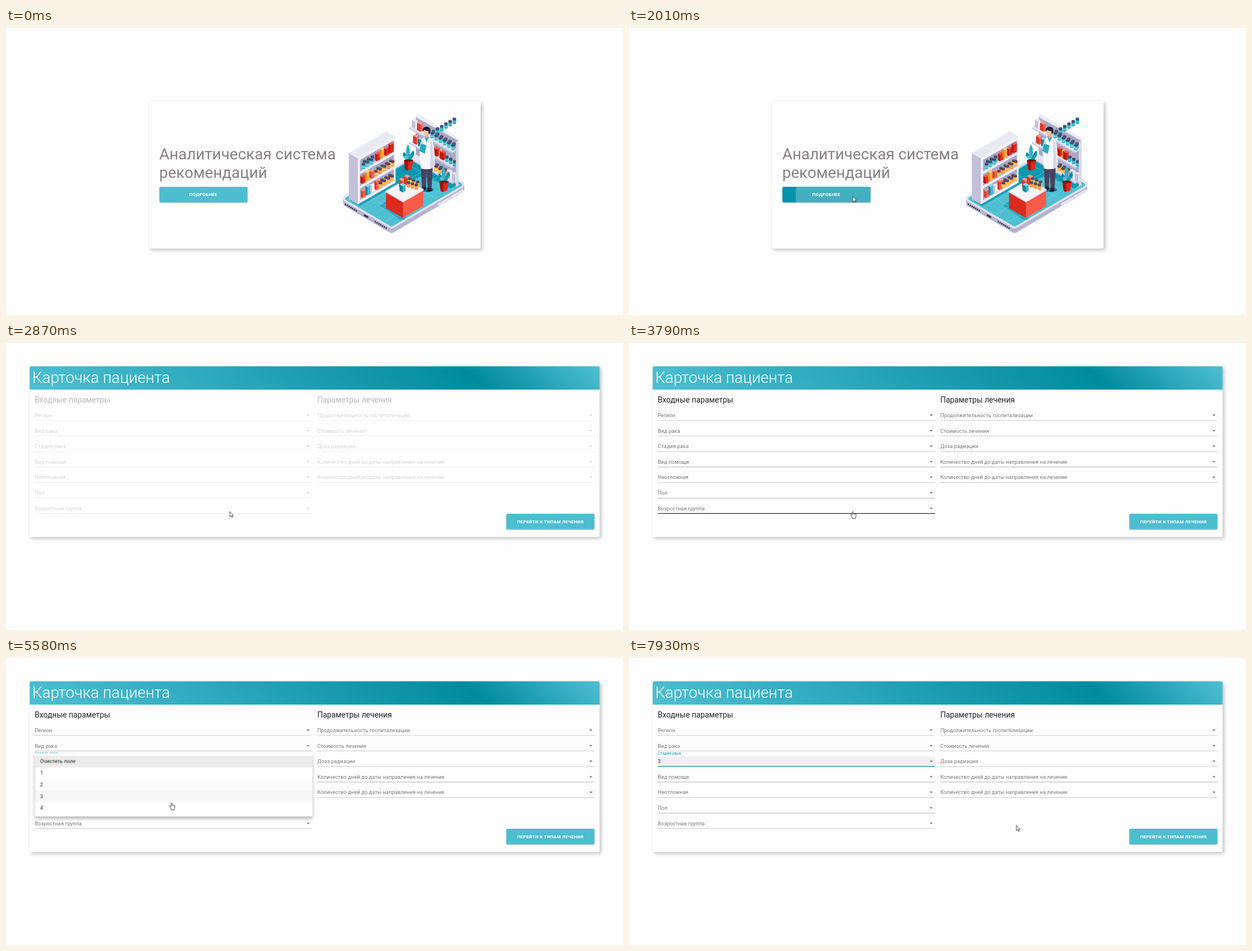
An HTML page that plays this animation: 1096 px wide and 511 px high, repeating every 8 s.

```html
<!DOCTYPE html>
<html lang="ru">
<head>
<meta charset="utf-8">
<title>Карточка пациента</title>
<style>
html, body { margin: 0; width: 100%; height: 100%; overflow: hidden; background: #fefefe; }
body { position: relative; font-family: Roboto, Arial, sans-serif; color: rgba(0,0,0,.87); }
body * { box-sizing: border-box; }
/* The interface is laid out on a 1903px wide page and scaled to the stage */
#page { position: absolute; left: 0; top: 0; width: 1903px; height: 888px; transform: scale(.57593); transform-origin: 0 0; }
#page div, #page svg, #cursor, #cursor svg { position: absolute; }
.card { background: #fefefe; border-radius: 5px; box-shadow: 5px 5px 12px rgba(0,0,0,.24), 0 0 4px rgba(0,0,0,.07); }
.h3 { font-size: 48px; line-height: 56px; white-space: nowrap; }
.btn {
  width: 272px; height: 48px; border-radius: 4px; overflow: hidden; background: #4dbdd0; color: #fff;
  font: 700 14px/48px Roboto, Arial, sans-serif; letter-spacing: .4px; text-align: center;
}
.lift { width: 272px; height: 48px; border-radius: 4px; box-shadow: 0 3px 1px -2px rgba(0,0,0,.2), 0 2px 2px rgba(0,0,0,.14), 0 1px 5px rgba(0,0,0,.12); }

#home { inset: 0; animation: home 8s step-end infinite; }
#home .card { left: 441px; top: 226px; width: 1023px; height: 456px; }
#home .h3 { left: 472.5px; top: 363px; color: #868184; }
#home .lift { left: 472.5px; top: 490.5px; }
#home .btn { animation: hover 8s infinite; }
#home .btn span { position: relative; }
#ripple { left: -2px; top: -189px; width: 438px; height: 438px; border-radius: 50%; background: #fff; opacity: 0; animation: ripple 8s infinite; }
#art { left: 0; top: 0; width: 1903px; height: 887.26px; }
@keyframes home { 0% { visibility: visible } 28% { visibility: hidden } }
@keyframes hover { 0%, 15% { background: #4dbdd0 } 18.1%, 100% { background: #0093aa } }
@keyframes ripple {
  0%, 22.2% { opacity: 0; transform: scale(0) }
  22.25% { opacity: .27; transform: scale(0); animation-timing-function: cubic-bezier(.4,0,.2,1) }
  27.75%, 28% { opacity: .27; transform: scale(1) }
  28.1%, 100% { opacity: 0; transform: scale(1) }
}

#patient { inset: 0; opacity: 0; animation: enter 8s infinite; }
#patient > .card { left: 73px; top: 72px; width: 1758px; height: 206px; animation: grow 8s step-end infinite; }
#patient .head {
  left: 0; top: 0; width: 100%; height: 72px; padding: 8px; border-radius: 5px 5px 0 0; color: #fff; font-weight: 300;
  background: linear-gradient(45deg, #4fbfd2 0%, #008b9f 77%, #4fbfd2 100%);
}
#patient .lift { right: 16px; bottom: 24px; }
@keyframes enter {
  0%, 28% { opacity: 0; animation-timing-function: cubic-bezier(.4,0,.2,1) }
  30.8%, 100% { opacity: 1 }
}
@keyframes grow { 0% { height: 206px } 35.125% { height: 528px } }

#spinner { left: 932px; top: 160px; width: 40px; height: 40px; fill: none; stroke-width: 3.6; animation: spin 8s infinite linear, wait 8s step-end infinite; }
@keyframes spin { 0%, 28% { transform: rotate(117deg) } 31.25%, 100% { transform: rotate(184deg) } }
@keyframes wait { 0% { visibility: visible } 35.125% { visibility: hidden } }

#form { inset: 0; opacity: 0; animation: form 8s infinite; }
@keyframes form { 0%, 35.125% { opacity: 0 } 38.75%, 100% { opacity: 1 } }
.h5 { top: 160px; font-size: 24px; line-height: 32px; white-space: nowrap; }
.field { width: 855.5px; height: 33px; border-bottom: 1px solid rgba(0,0,0,.42); }
.label { left: 0; top: 8.5px; font-size: 16px; line-height: 16px; letter-spacing: .15px; white-space: nowrap; color: rgba(0,0,0,.54); transform-origin: 0 0; }
.drop { right: 0; top: 4px; width: 24px; height: 24px; fill: rgba(0,0,0,.54); }
.line { left: 0; bottom: -1px; width: 100%; height: 2px; background: rgba(0,0,0,.87); opacity: 0; }
.float { animation: float 8s infinite; }
.fill { inset: 1px 0 0; background: rgba(0,0,0,.055); opacity: 0; animation: fill 8s infinite; }
.focus { background: #0097ad; opacity: 1; animation: focus 8s infinite; }
.value { left: 0; top: 8.5px; font-size: 16px; line-height: 16px; animation: value 8s step-end infinite; }
@keyframes float {
  0%, 62% { transform: none; color: rgba(0,0,0,.54); animation-timing-function: cubic-bezier(0,0,.2,1) }
  64.5%, 100% { transform: translateY(-23px) scale(.75); color: #0097ad }
}
@keyframes fill { 0%, 62% { opacity: 0 } 63%, 100% { opacity: 1 } }
@keyframes focus { 0%, 62% { transform: scaleX(0) } 64.5%, 100% { transform: none } }
@keyframes value { 0% { visibility: hidden } 88.5% { visibility: visible } }

#menu {
  left: 88.5px; top: 294px; width: 856px; height: 196px; border-radius: 4px; background: #fff; opacity: 0; transform-origin: 50% 26px;
  box-shadow: 0 5px 5px -3px rgba(0,0,0,.2), 0 8px 10px 1px rgba(0,0,0,.14), 0 3px 14px 2px rgba(0,0,0,.12);
  animation: menu 8s infinite;
}
.item { left: 0; width: 100%; height: 36px; padding-left: 16px; font-size: 16px; line-height: 36px; letter-spacing: .15px; }
.item:first-child { font-style: italic; background: #ebebeb; }
.tint { inset: 0; background: rgba(0,0,0,.04); opacity: 0; }
@keyframes menu {
  0%, 62% { opacity: 0; transform: scale(.75,.5625); animation-timing-function: cubic-bezier(.4,0,.2,1) }
  65%, 88.75% { opacity: 1; transform: none; animation-timing-function: cubic-bezier(.4,0,.2,1) }
  91.25%, 100% { opacity: 0; transform: scale(.75,.5625) }
}

#cursor { left: 0; top: 0; width: 0; height: 0; animation: move 8s linear infinite; }
#cursor svg { left: -8px; top: -2px; width: 24px; height: 24px; fill: #fff; stroke: #222; stroke-width: 1.4; stroke-linejoin: round; overflow: visible; }
#arrow { animation: arrow 8s step-end infinite; }
#hand { animation: hand 8s step-end infinite; }
@keyframes arrow { 0% { visibility: hidden } 2.625% { visibility: visible } 47.375% { visibility: hidden } 95.5% { visibility: visible } }
@keyframes hand { 0% { visibility: hidden } 47.375% { visibility: visible } 95.5% { visibility: hidden } }
@keyframes move {
  0%, 2.625% { transform: translate(993px,505px) }
  5.5% { transform: translate(770px,440px) }
  8.5% { transform: translate(590px,368px) }
  12.25%, 12.5% { transform: translate(468px,324px) }
  15% { transform: translate(426px,309px) }
  17.5% { transform: translate(401px,302px) }
  20%, 48.25% { transform: translate(397.5px,300px) }
  50.75% { transform: translate(392px,284px) }
  52.125% { transform: translate(365px,256px) }
  53.625% { transform: translate(338px,229px) }
  55.125% { transform: translate(312px,203px) }
  56.5% { transform: translate(296px,192px) }
  57.125%, 67.1% { transform: translate(294.5px,191px) }
  70.6% { transform: translate(294px,279px) }
  73.75%, 78% { transform: translate(293px,226px) }
  81.6%, 82.6% { transform: translate(297px,234px) }
  83.5% { transform: translate(298.5px,239px) }
  84.6%, 85.6% { transform: translate(299px,240px) }
  86.4%, 91% { transform: translate(299.5px,243px) }
  93.5% { transform: translate(410px,262px) }
  95.5% { transform: translate(550px,282px) }
  98.1% { transform: translate(682px,297px) }
  99.1%, 100% { transform: translate(688px,298px) }
}
</style>
</head>
<body>
<div id="page">
  <div id="home">
    <div class="card"></div>
    <div class="h3">Аналитическая система<br>рекомендаций</div>
    <div class="lift"><div class="btn"><div id="ripple"></div><span>ПОДРОБНЕЕ</span></div></div>
    <svg id="art" viewBox="0 0 1096 511"></svg>
  </div>
  <div id="patient">
    <div class="card">
      <div class="head h3">Карточка пациента</div>
      <div class="lift"><div class="btn">ПЕРЕЙТИ К ТИПАМ ЛЕЧЕНИЯ</div></div>
    </div>
    <svg id="spinner" viewBox="22 22 44 44">
      <circle cx="44" cy="44" r="20.2" stroke="#e9e9e9"/>
      <circle cx="44" cy="44" r="20.2" stroke="#4dbdd0" stroke-dasharray="88 127"/>
    </svg>
    <div id="form">
      <div class="h5" style="left:88.5px">Входные параметры</div>
      <div class="h5" style="left:960px">Параметры лечения</div>
    </div>
    <div id="menu"></div>
  </div>
</div>
<div id="cursor">
  <svg id="arrow"><g transform="translate(8 2) scale(.58)"><path d="M0 0V16.5L4 13 6.5 18.7 9 17.6 6.6 12H11.5Z"/></g></svg>
  <svg id="hand"><g transform="translate(8 2) scale(.6) translate(-6 -1)"><path d="M6 1.2c-1 0-1.7.8-1.7 1.7V12L3 10.5c-.8-1-2.2-1-2.7-.2-.4.7-.2 1.4.3 2.1L4.5 18v3.5H14v-3c1-1.8 1.6-3.5 1.6-5.5V9.5c0-1.6-2-1.9-2.4-.6-.2-1.6-2.4-1.9-2.8-.4-.3-1.5-2.4-1.6-2.7-.2V2.9c0-.9-.7-1.7-1.7-1.7z"/></g></svg>
</div>
<script>
const $ = id => document.getElementById(id);
const sheet = document.head.appendChild(document.createElement('style'));

// Opacity keyframes that are on during each [start, end] span, in ms
function glow(name, spans) {
  const ramp = 60, at = (t, o) => `${Math.min(t, 8000) / 80}%{opacity:${o}}`;
  const body = spans.map(([a, b]) => at(a, 0) + at(a + ramp, 1) + at(b, 1) + at(b + ramp, 0)).join('');
  sheet.textContent += `@keyframes ${name}{0%{opacity:0}${body}100%{opacity:0}}`;
  return `style="animation:${name} 8s infinite"`;
}

// Form
const rowHover = { 2: [4500, 5000], 3: [4330, 4410], 4: [4210, 4290], 5: [4080, 4170], 6: [3728, 4060] };
const days = 'Количество дней до даты направления на лечение';
const columns = [
  ['Регион', 'Вид рака', 'Стадия рака', 'Вид помощи', 'Неотложная', 'Пол', 'Возростная группа'],
  ['Продолжительность госпитализации', 'Стоимость лечения', 'Доза радиации', days, days]
];
columns.forEach((names, col) => names.forEach((name, i) => {
  const active = !col && i === 2, hot = !col && rowHover[i];
  $('form').insertAdjacentHTML('beforeend',
    `<div class="field" style="left:${col ? 960 : 88.5}px;top:${207 + 48 * i}px">
      ${active ? '<div class="fill"></div><div class="value">3</div>' : ''}
      <div class="label ${active ? 'float' : ''}">${name}</div>
      <svg class="drop" viewBox="0 0 24 24"><path d="M7 10l5 5 5-5z"/></svg>
      ${hot ? `<div class="line" ${glow('row' + i, [hot])}></div>` : ''}
      ${active ? '<div class="line focus"></div>' : ''}
    </div>`);
}));

// Drop-down list
const itemHover = [
  [[4960, 5450]], [[5440, 5510]], [[5490, 5560], [5850, 6650]],
  [[5540, 5610], [5750, 5840], [6650, 7400]], [[5595, 5740]]
];
$('menu').innerHTML = ['Очистить поле', 1, 2, 3, 4].map((text, i) =>
  `<div class="item" style="top:${8 + 36 * i}px"><div class="tint" ${glow('item' + i, itemHover[i])}></div>${text}</div>`).join('');

// Isometric pharmacy
const K = .58, DARK = '#3b3853', TEAL = '#1fa3ba', RED = '#dc2a1f', CORAL = '#fb5b49', AMBER = '#fbb03b';
const WHITES = ['#c3c0d9', '#f1f1f8', '#e9e9f2'], REDS = ['#b8170f', RED, CORAL];
const CORALS = ['#d93a2c', CORAL, '#ff9a8c'], AMBERS = ['#e08a1c', AMBER, '#ffd27d'], TEALS = ['#0b869c', '#3fb8cc', '#8fdce7'];
const shape = (fill, d, more = '') => `<path d="${d}" fill="${fill}" ${more}/>`;
const poly = (fill, pts, more) => shape(fill, `M${pts}Z`, more);
const repeat = (n, f) => Array.from({ length: n }, (_, i) => f(i)).join('');

// Box with front bottom corner x,y; a runs up-left, b runs up-right
function block(x, y, a, b, h, [left, right, top]) {
  const p = a * K, q = b * K;
  return shape(left, `M${x} ${y}l${-a} ${-p}v${-h}l${a} ${p}z`) +
    shape(right, `M${x} ${y}l${b} ${-q}v${-h}l${-b} ${q}z`) +
    shape(top, `M${x} ${y - h}l${-a} ${-p}l${b} ${-q}l${a} ${p}z`);
}
const jar = (x, y, color) =>
  shape(color, `M${x - 3.2} ${y - 8}v7q3.2 2.4 6.4 0v-7z`) +
  shape('#fff', `M${x - 3.2} ${y - 5}q3.2 2 6.4 0v2q-3.2 2-6.4 0z`, 'opacity=".35"') +
  shape(DARK, `M${x - 3} ${y - 10}v2.4q3 2 6 0v-2.4z`) +
  `<ellipse cx="${x}" cy="${y - 10}" rx="3" ry="1.5" fill="#5a5674"/>`;
const jars = (n, x, y, dx, colors) => {
  const slope = dx > 0 ? -K : K;
  return repeat(n, i => jar(x + dx * i, y + Math.abs(dx) * i * slope, colors[i % colors.length]));
};

function floor() {
  const top = 'M605 304L685 351 808 279 728 232Z', round = (c, w) => `stroke="${c}" stroke-width="${w}" stroke-linejoin="round"`;
  const vents = (x, y) => repeat(7, i => `<ellipse cx="${x + 3.2 * i}" cy="${y + 3.2 * K * i}" rx="1.3" ry="1.7" fill="${DARK}"/>`);
  const key = (x, y) => shape('#e6e5f1', `M${x} ${y}l19 -11`, 'stroke="#e6e5f1" stroke-width="4" stroke-linecap="round"');
  return shape('#b6b3d0', 'M605 304v8L685 359 808 287v-8L728 232Z', round('#b6b3d0', 12)) +
    shape('#e4e3ef', top, round('#e4e3ef', 12)) +
    shape('#4fc0d2', top, round('#4fc0d2', 5)) +
    poly('#0c98af', '692,252 728,231 806,276 790,286 742,263 716,272 692,281') +
    poly('#1f9fb5', '612,308 692,262 697,277 628,317') +
    poly('#2ba6bb', '664,316 690,299 720,310 708,341 700,341') +
    repeat(3, i => shape('none', `M${630 + 22 * i} ${319 + 12.8 * i}l112 -65`, 'stroke="#74cfdd" stroke-width=".7"')) +
    repeat(4, i => shape('none', `M${630 + 28 * i} ${291 - 16 * i}l78 45`, 'stroke="#74cfdd" stroke-width=".7"')) +
    vents(603, 314) + vents(656, 345) +
    shape(DARK, 'M637 333.500l5 3', `stroke="${DARK}" stroke-width="3.5" stroke-linecap="round"`) +
    key(769, 314) + key(792, 300.5);
}

function leftShelf() {
  const base = (row, x) => 257 + 25.5 * row - K * (x - 625);
  const boxes = (row, x, n, palettes) => repeat(n, i =>
    block(x + 8 * i, base(row, x + 8 * i), 3.5, 6, 12 + i % 2 * 3, palettes[i % palettes.length]));
  return block(625, 314, 16, 67, 82, WHITES) +
    `<g transform="matrix(1 -.58 0 1 625 232)">` +
    repeat(3, i => `<rect x="4" y="${5 + 25.5 * i}" width="60" height="21" fill="#a9a6c6"/>` +
      `<path d="M4 ${26 + 25.5 * i}l7 -4h53v4z" fill="#d3d1e3"/>`) + '</g>' +
    jars(3, 637, base(0, 637) - 4, 7, [TEAL]) + jars(3, 635, base(0, 635), 7, ['#3fb8cc']) +
    boxes(0, 659, 4, [REDS, AMBERS, REDS, REDS]) +
    boxes(1, 633, 3, [REDS, AMBERS, CORALS]) +
    jars(4, 661, base(1, 661) - 3, 7.5, [CORAL, AMBER]) + jars(5, 657, base(1, 657), 7.5, [AMBER, '#f28a2e']) +
    boxes(2, 634, 4, [CORALS, TEALS, WHITES, CORALS]) +
    jars(3, 668, base(2, 668) - 4, 7, [RED, AMBER]) + jars(4, 665, base(2, 665), 7, [AMBER]);
}

function rightShelf() {
  const base = (row, x) => 219 + 27 * row - K * (798 - x);
  const boards = row => block(793, 224 + 27 * row, 77, 11, 2.5, ['#c6c4da', '#b1aecb', '#e4e3ef']);
  const boxes = (row, x, n, palettes) => repeat(n, i =>
    block(x + 9 * i, base(row, x + 9 * i) + 2, 6, 4, 13, palettes[i % palettes.length]));
  return poly('#aaa7c7', '728,156 804,200 804,281 728,237') +
    poly('#ecebf4', '728,155 732,153.500 806,197 804,201 728,159') +
    boards(0) + boxes(0, 727, 2, [WHITES, CORALS]) +
    jars(6, 759, base(0, 759) - 4, 7.5, [TEAL]).replace(/NaN/g, '0') +
    '' + repeat(6, i => jar(759 + 7.4 * i, base(0, 759 + 7.4 * i) - 3, TEAL)) +
    repeat(6, i => jar(757 + 7.4 * i, base(0, 757 + 7.4 * i) + 1, '#3fb8cc')) +
    boards(1) + boxes(1, 729, 1, [CORALS]) + boxes(1, 738, 1, [TEALS]) +
    boxes(1, 766, 2, [REDS, AMBERS]) + boxes(1, 777, 1, [REDS]) +
    repeat(3, i => jar(783 + 7 * i, base(1, 783 + 7 * i) + 1, TEAL)) +
    boards(2) + repeat(3, i => jar(766 + 7 * i, base(2, 766 + 7 * i) - 2, CORAL)) +
    repeat(3, i => jar(764 + 7 * i, base(2, 764 + 7 * i) + 2, AMBER)) +
    boxes(2, 789, 2, [WHITES]) +
    poly('#d9d8e7', '799,203 804,200 804,280 799,283');
}

function plant(x, y) {
  const leaf = (dx, h, c) => shape(c, `M${x} ${y - 15}Q${x + dx - 7} ${y - 18 - h / 2} ${x + dx} ${y - 15 - h}Q${x + dx + 7} ${y - 18 - h / 2} ${x} ${y - 15}Z`);
  return leaf(-8, 17, '#0e8da3') + leaf(8, 20, '#0e8da3') + leaf(-1, 31, '#2fb0c5') + leaf(-5, 11, '#53c4d5') + leaf(5, 12, '#1a9db3') +
    shape(RED, `M${x - 8} ${y - 17}h16l-2 15q-6 4-12 0z`) +
    shape('#a8120c', `M${x - 8} ${y - 17}h7v18q-3 0-5-2z`) +
    `<ellipse cx="${x}" cy="${y - 17}" rx="8" ry="2.4" fill="#7f1511"/>`;
}

const pharmacist = () =>
  `<ellipse cx="748" cy="288" rx="12" ry="4" fill="#0a8298"/>` +
  shape('#46435c', 'M737 246h21l-2 40h-7l-2-33-1 33h-7z') +
  shape('#25233a', 'M739 283h7v5q-5 2-9 0zM749 285h7v5q-5 3-9 1z') +
  shape('#f7f7fc', 'M739 198q-5 14-4 32l2 20q12 4 24-2 2-28-3-47-2-6-11-8-6 1-8 5z') +
  shape('#d8d6e7', 'M753 198q6 4 5 22l3 28-8 3q2-26 0-53z') +
  shape('#35b2c7', 'M743 194l4 10 5-10z') +
  shape('#f2a88d', 'M744 189h6v5q-3 3-6 0z') +
  `<ellipse cx="746" cy="185" rx="5" ry="6.500" fill="#f8bfa3"/>` +
  shape('#221f33', 'M740 184q-1-7 5-8 8-1 9 6 0 5-3 8l-1-7q-5 1-7-2-1 3-3 3z') +
  shape('#ececf5', 'M739 199q-7 13-4 22l9-2-1-5-4-1 4-11z') +
  poly('#2aa9be', '737,205 747,209 744,224 734,219') +
  `<circle cx="738" cy="205" r="2.200" fill="#f8bfa3"/>`;

const counter = () =>
  block(705, 338, 30, 36, 29, [RED, CORAL, '#eeeef6']) +
  block(705, 310.5, 31, 37, 2, ['#cfcde0', '#e3e2ee', '#f4f4fa']) +
  block(704, 286, 6, 5, 13, CORALS) + block(713, 281, 6, 5, 14, CORALS) + block(705, 293, 6, 5, 11, TEALS) +
  repeat(3, i => jar(717 + 7 * i, 277 + 3 * i, AMBER)) +
  repeat(3, i => jar(715 + 7 * i, 284 + 2 * i, '#f28a2e'));

$('art').innerHTML = floor() + leftShelf() + rightShelf() + plant(715, 253) + pharmacist() + plant(778, 291) + counter();
</script>
</body>
</html>
```
